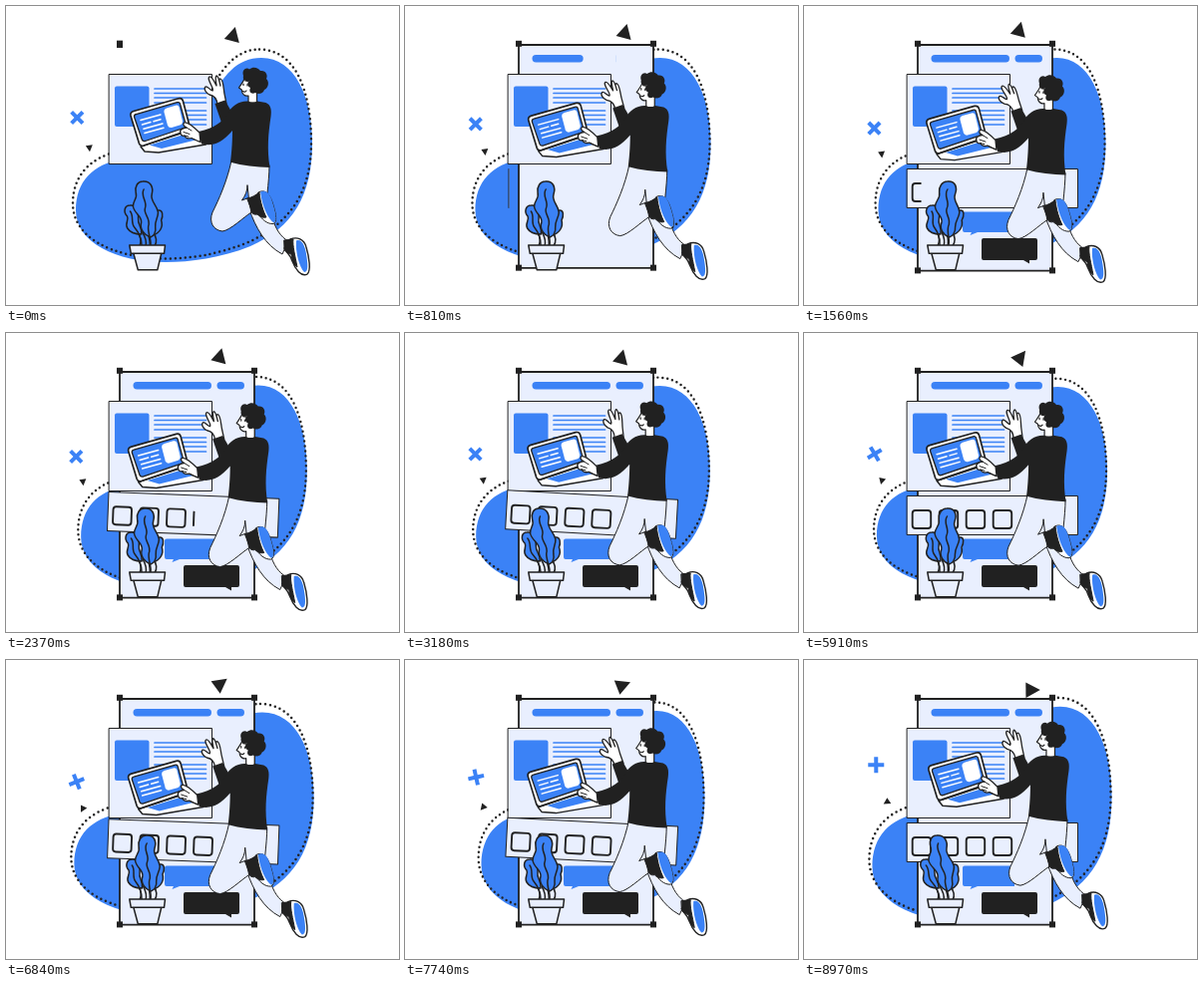
These frames come from a looping animation (394 by 300 pixels, 9 s). An HTML page:

```html
<!DOCTYPE html>
<html lang="en">
<head>
<meta charset="utf-8">
<title>Building a page</title>
<style>
  html, body { margin: 0; width: 100%; height: 100%; overflow: hidden; background: #fff; }
  svg { display: block; width: 100vw; height: 100vh; }
  .blue { fill: #3b82f6; }
  .dark { fill: #212121; }
  .pale { fill: #e9effe; }
  .white { fill: #fff; }
  .line { stroke: #212121; stroke-width: 1.5; stroke-linejoin: round; stroke-linecap: round; }
  .thin { stroke-width: 1; }
  .none { fill: none; }
</style>
</head>
<body>
<svg viewBox="0 0 394 300">
  <g id="blob">
    <path class="blue" d="M256 52C290 52 307 92 307 137C307 190 288 222 245 241C215 253 185 257 160 257C110 257 70 237 70 205C70 175 88 159 115 154C160 148 190 130 205 97C216 70 232 52 256 52Z"/>
    <path class="none line" style="stroke-width:2.5" stroke-dasharray="0 5" d="M254 43.500C290 43.500 306 85 306 137C306 188 284 218 243 237C210 250 185 253.500 158 253.500C105 252 67 232 67 198C67 170 85 152 112 146C155 138 190 122 203 92C213 65 230 43.500 254 43.500Z"/>
  </g>

  <path id="cross" class="blue" d="M-8-2H-2V-8H2V-2H8V2H2V8H-2V2H-8Z"/>
  <path id="bigTri" class="dark" d="M2.300-9.300L-8.700 2.700L6.300 6.700Z"/>
  <path id="smallTri" class="dark" d="M-3.600-1.700L3.300-2.700L.5 4.300Z"/>

  <rect id="page" class="pale line" x="114" y="39" style="stroke-width:1.8"/>
  <g id="corners" class="dark"></g>
  <rect id="pillA" class="blue" x="127.500" y="49" height="7.500" rx="3.700"/>
  <rect id="pillB" class="blue" x="211.500" y="49" height="7.500" rx="3.700"/>

  <rect class="pale line thin" x="103.500" y="68.500" width="103" height="90"/>
  <rect class="blue" x="109" y="80.500" width="34.500" height="40.500" rx="2"/>
  <path id="text" stroke="#3b82f6" stroke-width="1.700" stroke-linecap="round"/>

  <g id="strip">
    <rect class="pale line thin" x="103.500" y="163.500" width="171" height="39"/>
    <g id="boxes" class="none line" style="stroke-width:1.9"></g>
  </g>

  <path id="bubbleA" class="blue" d="M161 206.500H211V227H174L166.500 230L168 227H161Q159 227 159 225V208.500Q159 206.500 161 206.500Z"/>
  <path id="bubbleB" class="dark" d="M180 233H232Q234 233 234 235V253Q234 255 232 255H226V258.500L220 255H180Q178 255 178 253V235Q178 233 180 233Z"/>

  <g id="leaves" class="line">
    <path class="none" d="M134 241C136 236 135 231 132 227M140 241C141 237 140 232 137 227M144 241C145 236 143 231 142 227M149 241C152 236 150 230 147 226"/>
    <path class="blue" d="M125 200C119 200 118 207 122 211C124 215 119 218 122 223C125 228 130 229 136 229C137 222 132 219 133 213C134 207 131 199 125 200Z"/>
    <path class="blue" d="M153 205C158 204 158 211 156 215C158 221 155 228 147 230C146 222 147 216 149 212C149 208 150 205 153 205Z"/>
    <path class="blue" d="M138 176C146 175 149 182 147 189C145 196 152 199 153 207C153 213 149 216 150 222C151 227 148 231 145 232C139 230 134 224 136 217C137 211 129 208 128 201C128 195 133 193 131 187C130 181 133 176 138 176Z"/>
    <path class="none" d="M139 184C135 191 143 196 140 203C138 209 146 213 143 221C142 228 146 234 145 240M125 206C129 211 125 217 129 222C134 228 136 234 136 240"/>
  </g>
  <g class="pale line">
    <path d="M127.800 248L132.300 264.800H151.800L155.800 248Z"/>
    <path d="M123.800 240H159.500L158.500 248.300H125.300Z"/>
  </g>

  <g id="person">
    <g class="line" style="stroke-width:1.500">
      <path class="white" d="M135 141L184 125L202 134Q203 137 200 139L153 147L139 146Z"/>
      <path class="blue" style="stroke:none" d="M144 139.500L183 127.500L196 133L156 143Z"/>
      <path class="white" style="stroke-width:1.700" d="M128 105.500L173 92.800Q176.500 92 177.500 95.500L185 124L138 140Q134.500 141 133.500 138L125 110Q124.300 106.500 128 105.500Z"/>
      <path class="blue" style="stroke-width:1.300" d="M130.500 108.500L171.500 96.700Q174 96 174.600 98.500L181 121.500L139.500 135.500Q137 136 136.300 134L128.600 111.500Q128.200 109 130.500 108.500Z"/>
      <path class="white" style="stroke:none" d="M161 102.500L170 99.800Q172.800 99 173.600 101.500L177 115.500Q177.300 118.500 175 119.300L166 122Q163 122.500 162 119.700L158.500 106.500Q158 103.500 161 102.500Z"/>
    </g>
    <path stroke="#fff" stroke-width="1.500" stroke-linecap="round" d="M135 114.500L155 109M136.500 119L145 116.500M148 115.700L155 113.700M138 123.200L157 118M139 127.500L158 122.200"/>

    <g class="line thin">
      <path class="pale" d="M244 204C250 222 260 240 277 249L283 236C276 232 270 224 267 212L262 190L245 195Z"/>
      <path class="pale" fill-rule="evenodd" d="M226 155C222 175 213 195 207 207C203 217 208 225 217 226C225 225 238 212 246 207L243 194L262 188C263 178 264 168 264 160ZM242 180C242 186 240 190 236.500 195L243 192.500Z"/>
      <path class="white" d="M253 187C260 183 265 189 268 200C271 210 272 217 268 218.500C262 219 256 214 253 208Z"/>
      <path class="dark" d="M242 193C247 192 250 190 254 187C255 197 258 206 261 212C257 213 254 211 252 209C248 210 245 207 246 205Z"/>
      <path class="blue" style="stroke:none" d="M255 186.500C262 183.500 265.500 190 268 200C271 210 271.500 216 268.500 217.500C263 214 257 202 255 186.500Z"/>
      <path class="white" style="stroke-width:1.400" d="M285 234C292 231 299 234 301 242C304 252 306 266 302 269C296 272 290 264 287 256C285 248 280 247 279 243Z"/>
      <path class="dark" d="M279 235L288 234C287 240 290 251 292 262C288 260 287 255 286 249C282 248 279 246 279 243Z"/>
      <path class="blue" style="stroke:none" d="M291 235.500C297 233 300.500 242 301.500 252C303 262 302.500 267 299 267C294 262 290 247 291 235.500Z"/>
    </g>

    <g id="wave">
      <path class="white line" style="stroke-width:1.300" d="M212 99C211.500 93 209 90 204 89C200 87 198 83 200 81C202 80 204 84 207 85C208 84 207 82 206 80C204 76 202 72 204 71C206 70 209 76 211 80C211 77 209 72 211 70C213 70 214 76 215 80C214 76 213 73 215 73C218 74 218 83 219 88L221 98Z"/>
    </g>
    <path class="dark" d="M209.500 98L219.500 94.500L226 106L216 117Z"/>
    <path class="white line" style="stroke-width:1.200" d="M240 71C238 76 235.500 79 233.500 82L236.300 84C236.500 88 239 91 243 90V97H251.500V84L250 74Z"/>
    <path class="none line" style="stroke-width:1.200" d="M238 78V79.500M242 78.500V80M243 75.500L240 75M237.500 85.500Q239.500 87 241 85"/>
    <path class="dark" d="M238 70C236 64 241 61 244 63.500C248 60 253 62 255 65C260 64 263 69 261 73C265 77 262 83 259 84C258 88 253 89 250 87C246 89 243 86 245 82C241 80 242 76 244 75C240 76 237 74 238 70Z"/>
    <path class="dark" d="M243 95.500Q247 98 252 95.500L260.500 97C265.500 99 266.500 104 265.500 111C263 128 261.500 143 264.500 162C251 161.500 237 160 225 156.700C226.500 145 227 133 227 125C216 138 207 141 196 138.500L193 126C210 122 217 116 222 108C227 100 233 95 243 95.500Z"/>
    <path class="white line" style="stroke-width:1.300" d="M194 127C188 121 182 115.500 178.500 117C176.500 119 179 121 181 122C177 122 173.500 125 175 127C174.500 129 177 131 179 130C179.500 132.500 183 133.500 186 132.500C189 134 192 135.500 195 136.500Z"/>
    <path class="none line thin" d="M181 122L186 125M178 126.500L184 128.500M179 130L183 131"/>
  </g>
</svg>
<script>
const LOOP = 9000, HALF = LOOP / 2;
const NS = 'http://www.w3.org/2000/svg';
const $ = id => document.getElementById(id);
const set = (el, attrs) => { for (const k in attrs) el.setAttribute(k, attrs[k]); };
const add = (parent, tag, attrs) => {
  const el = document.createElementNS(NS, tag);
  set(el, attrs);
  return parent.appendChild(el);
};
const place = (id, value) => $(id).setAttribute('transform', value);
const clamp = v => Math.min(1, Math.max(0, v));
const smooth = v => v * v * (3 - 2 * v);
const ramp = (t, from, to) => smooth(clamp((t - from) / (to - from)));

// Eased value from a list of [time, value] steps
function track(steps, t) {
  const i = steps.findIndex(s => s[0] > t);
  if (i < 0) return steps[steps.length - 1][1];
  if (i === 0) return steps[0][1];
  const [t0, a] = steps[i - 1], [t1, b] = steps[i];
  return a + (b - a) * smooth((t - t0) / (t1 - t0));
}

const wide = [[0, 1], [400, 1.01], [1560, .962], [2100, .95], [3180, .99], [3700, 1.01],
  [4710, .995], [5300, .965], [5910, .975], [6950, 1.015], [7740, .945], [8970, 1.013]];
const tall = [[0, 1], [1560, 1], [3180, .99], [4710, .99], [5910, .98], [7740, 1.01], [8970, 1.05]];
const sway = [[0, -1], [1560, 5.5], [3180, -4], [4710, 2], [5910, 5], [7740, 0], [8970, -5]];
const wave = [[0, 0], [1560, -7], [3180, 5], [4710, -3], [5910, 4], [7740, -8], [8970, -1]];
const tilt = [[1700, 0], [2850, 3.6], [3180, 3.2], [3240, 2.9], [4100, 0]];

const lines = [83, 87.5, 92, 97, 105, 109.5, 114, 119];
$('text').setAttribute('d', lines.map(y => `M149 ${y}H200.500`).join(''));

const corners = [0, 1, 2, 3].map(() => add($('corners'), 'rect', { width: 6, height: 6 }));
const boxes = [0, 1, 2, 3].map(i => add($('boxes'), 'path', {
  pathLength: 100,
  'stroke-linecap': 'butt',
  d: `M${108.7 + 27 * i} 187v-6q0-3 3-3h12.500q3 0 3 3v12q0 3-3 3h-12.500q-3 0-3-3z`
}));

function pop(id, x, y, k) {
  place(id, `translate(${x} ${y}) scale(${k}) translate(${-x} ${-y})`);
}

function drawPage(t) {
  const w = 135 * ramp(t, 0, 450), h = 226.6 * ramp(t, 250, 850);
  set($('page'), { width: w, height: h, visibility: w > .5 ? 'visible' : 'hidden' });
  corners.forEach((c, i) => set(c, {
    x: 111 + (i % 2) * w,
    y: 34.8 + (i > 1 ? h + 1 : 0)
  }));
  $('pillA').setAttribute('width', 78.5 * ramp(t, 600, 950));
  $('pillB').setAttribute('width', 27.5 * ramp(t, 800, 1050));
  pop('bubbleA', 166, 228, ramp(t, 950, 1250));
  pop('bubbleB', 224, 256, ramp(t, 1100, 1400));
}

function drawStrip(t, phase) {
  const a = track(tilt, phase), k = ramp(t, 800, 1250);
  place('strip', `translate(${-.6 * a} ${-.3 * a}) rotate(${a} 189.500 183.500) translate(104 0) scale(${k} 1) translate(-104 0)`);
  $('strip').setAttribute('visibility', k > 0 ? 'visible' : 'hidden');
  boxes.forEach((b, i) => {
    const p = clamp((t - 1400 - 300 * i) / 330);
    set(b, {
      'stroke-dasharray': p === 1 ? 'none' : `${50 * p} ${100 - 100 * p} ${50 * p} 0`,
      visibility: p > 0 ? 'visible' : 'hidden'
    });
  });
}

function drawShapes(t, s) {
  const spin = clamp((t - HALF) / HALF);
  place('cross', `translate(${71.3 - s + spin} ${112 + 12 * s - 7 * spin * spin}) rotate(${45 * spin - 45})`);
  place('bigTri', `translate(${227.5 - 13.5 * s} ${30.3 - 5.8 * s}) rotate(${75 * spin})`);
  place('smallTri', `translate(${83.5 - 6.5 * s} ${142 + 7 * s}) rotate(${65 * spin})`);
  place('blob', `translate(188 155) scale(${track(wide, t)} ${track(tall, t)}) translate(-188 -155)`);
}

function draw(t) {
  const phase = t % HALF, s = Math.sin(Math.PI * phase / HALF);
  drawPage(t);
  drawStrip(t, phase);
  drawShapes(t, s);
  place('person', `translate(${-2.3 * s} ${8.6 * s})`);
  place('wave', `rotate(${track(wave, t)} 215 99)`);
  const lean = -Math.atan(track(sway, t) / 63) * 180 / Math.PI;
  place('leaves', `translate(0 240) skewX(${lean}) translate(0 -240)`);
}

const start = performance.now();
function tick() {
  draw((performance.now() - start) % LOOP);
  requestAnimationFrame(tick);
}
tick();
</script>
</body>
</html>
```
